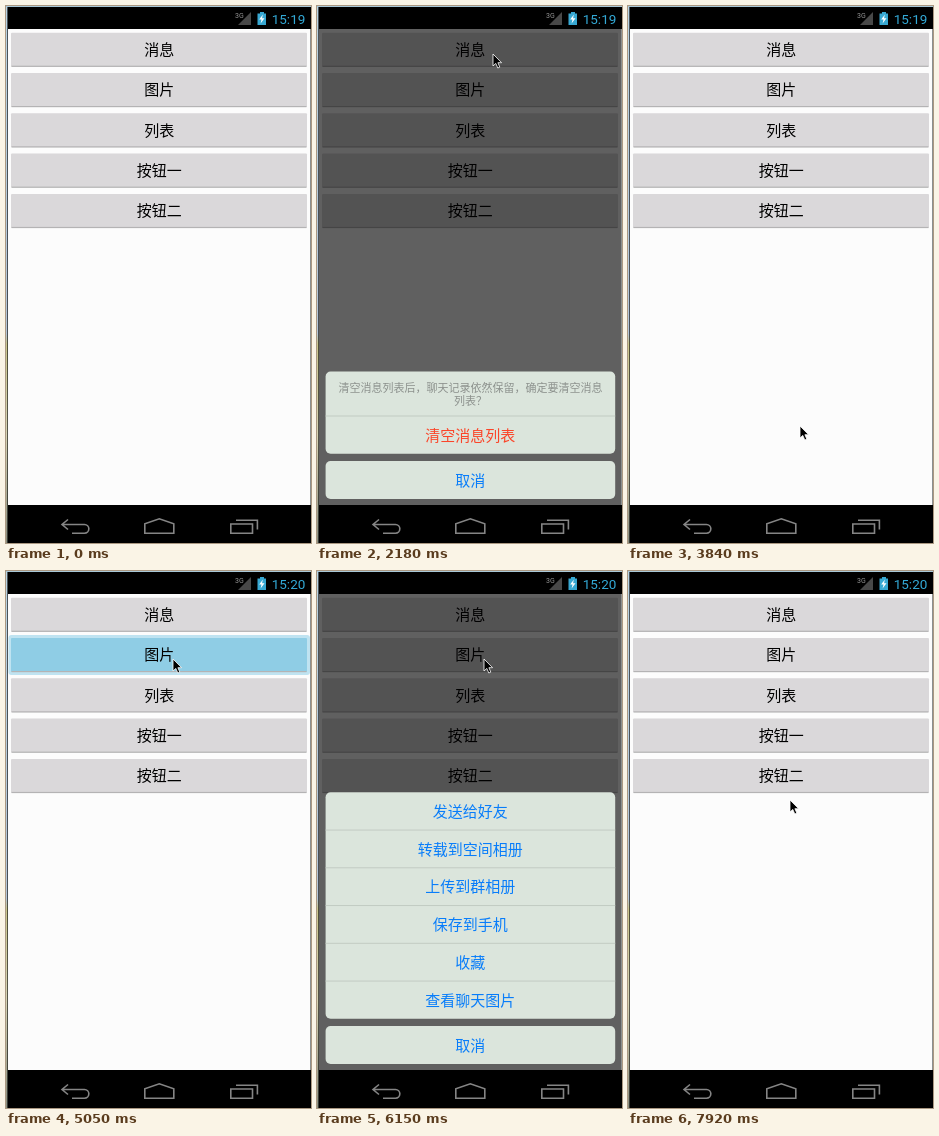
Recreate the animation shown at these times as an HTML page. Size 305 by 537 pixels, loop 8 s.

```html
<!DOCTYPE html>
<html lang="zh">
<head>
<meta charset="utf-8">
<title>底部菜单</title>
<style>
html, body { margin: 0; width: 100%; height: 100%; overflow: hidden; background: #000; }
svg { display: block; width: 305px; height: 537px; }
text { font-family: "Noto Sans CJK SC", "Noto Sans CJK", "Noto Sans", sans-serif; font-size: 15px; text-anchor: middle; }
.latin { font-family: Roboto, sans-serif; text-anchor: start; }
</style>
</head>
<body>
<svg viewBox="0 0 305 537">
  <defs>
    <linearGradient id="edge" x1="0" y1="0" x2="0" y2="1">
      <stop offset="0" stop-color="#b9d3e2"/>
      <stop offset=".61" stop-color="#b4c5d8"/>
      <stop offset=".63" stop-color="#c9c58c"/>
      <stop offset=".8" stop-color="#d6d3b4"/>
      <stop offset="1" stop-color="#8b8f80"/>
    </linearGradient>
    <clipPath id="screen"><rect x="2" y="23" width="303" height="476"/></clipPath>
  </defs>
  <rect width="305" height="537"/>
  <rect x="2" y="23" width="303" height="476" fill="#fcfcfc"/>
  <g id="buttons"></g>
  <rect id="dim" x="2" y="23" width="303" height="476"/>
  <g clip-path="url(#screen)">
    <g id="sheetA"></g>
    <g id="sheetB"></g>
  </g>
  <rect x="304" y="23" width="1" height="476" fill="#8c9090"/>
  <rect width="1.4" height="537" fill="url(#edge)"/>
  <rect width="305" height="1" fill="#a9c8d8"/>

  <path d="M232 19 L245 6 V19 Z" fill="#484848"/>
  <text class="latin" x="229" y="12" style="font-size:7px" fill="#949494">3G</text>
  <path d="M254 6 h4 v1.5 h2 V19 h-8.5 V7.5 h2.5 Z" fill="#38a8d2"/>
  <path d="M256.8 8.5 l-3.6 5 h2.3 l-.9 4 3.9 -5.2 h-2.4 Z" fill="#fff"/>
  <text id="clock" class="latin" x="265.7" y="17.7" style="font-size:13.5px" fill="#33a9d6"></text>

  <g fill="none" stroke="#858585" stroke-width="1.6">
    <path d="M62 513.5 L56 518.5 L62 523.5 M56 518.5 H78.5 A4.3 4.3 0 0 1 78.5 527.2 H66"/>
    <path d="M138.8 527.2 V517.8 L153.3 512.8 L167.8 517.8 V527.2 Z"/>
    <path d="M224.8 518 H246.5 V527.2 H224.8 Z M230 514.2 H251.4 V523.5"/>
  </g>
  <path id="cursor" d="M0 0 V12 L2.8 9.4 L4.8 14 L6.8 13.1 L4.9 8.7 H8.6 Z" stroke="#fff" stroke-width=".8"/>
</svg>
<script>
const LOOP = 8000, BLUE = "#087dfa", RED = "#fb4529", SHEET = "#dbe5dc";
const $ = id => document.getElementById(id);

function add(parent, tag, attrs, text) {
  const el = document.createElementNS("http://www.w3.org/2000/svg", tag);
  for (const k in attrs) el.setAttribute(k, attrs[k]);
  if (text) el.textContent = text;
  parent.append(el);
  return el;
}
const show = (el, on) => el.setAttribute("visibility", on ? "visible" : "hidden");
const label = (parent, text, cy, fill = "#000") => add(parent, "text", { x: 153.3, y: cy + 5.6, fill }, text);

// Main buttons
const buttons = ["消息", "图片", "列表", "按钮一", "按钮二"].map((name, i) => {
  const y = 26.7 + i * 40.3, g = $("buttons");
  const glow = add(g, "rect", { x: 2.5, y: y - 3, width: 301.5, height: 40, rx: 3, fill: "#bfe3f1" });
  const face = add(g, "rect", { x: 5, y, width: 296, height: 34, rx: 1 });
  add(g, "rect", { x: 5.5, y: y + 33, width: 295, height: 1.2, fill: "#b4b3b4" });
  label(g, name, y + 16.8);
  return on => {
    show(glow, on);
    face.setAttribute("fill", on ? "#8fcde5" : "#dad8da");
  };
});

// Bottom sheets
const ROW = 37.75, BOTTOM = 447.8;
const panel = (g, y, h) => add(g, "rect", { x: 8.6, y, width: 289.6, height: h, rx: 5, fill: SHEET });
const rule = (g, y) => add(g, "rect", { x: 8.6, y: y - .5, width: 289.6, height: 1, fill: "#c2cbc3" });
const pressRow = (g, d) => add(g, "path", { d, fill: "#b9c3ba" });
function cancel(g) {
  panel(g, 455, 38);
  label(g, "取消", 474, BLUE);
}

const sheetA = $("sheetA"), sheetB = $("sheetB");
panel(sheetA, 365.6, BOTTOM - 365.6);
const pressA = pressRow(sheetA, "M8.6 410 H298.2 V442.8 a5 5 0 0 1 -5 5 H13.6 a5 5 0 0 1 -5 -5 Z");
rule(sheetA, 410);
["清空消息列表后，聊天记录依然保留，确定要清空消息", "列表？"].forEach((line, i) =>
  add(sheetA, "text", { x: 153.5, y: 385.8 + i * 13, fill: "#8c918d", style: "font-size:11px" }, line));
label(sheetA, "清空消息列表", 429.3, RED);
cancel(sheetA);

const items = ["发送给好友", "转载到空间相册", "上传到群相册", "保存到手机", "收藏", "查看聊天图片"];
const topB = BOTTOM - ROW * items.length;
panel(sheetB, topB, ROW * items.length);
const pressB = pressRow(sheetB, `M8.6 ${topB + 2 * ROW} h289.6 v${ROW} h-289.6 Z`);
items.forEach((name, i) => {
  if (i) rule(sheetB, topB + i * ROW);
  label(sheetB, name, topB + (i + .5) * ROW, BLUE);
});
cancel(sheetB);

// Cursor trips: step times, start point, end point
const trips = [
  [[400, 540, 690, 830, 980, 1120], [296, 330], [176, 48]],
  [[2480, 2610, 2740, 2880, 3010, 3140], [176, 48], [172, 420]],
  [[4140, 4270, 4390, 4520, 4640, 4770], [172, 420], [167, 88]],
  [[6190, 6350, 6500, 6660, 6820], [167, 88], [162, 318]],
  [[7770, 7920], [162, 318], [162, 229]]
];
const ease = u => u * u * (3 - 2 * u);

function cursorAt(t) {
  const trip = trips.filter(([times]) => t >= times[0]).pop();
  if (!trip) return null;
  const [times, from, to] = trip;
  const u = ease(times.filter(s => s <= t).length / times.length);
  return from.map((v, i) => v + (to[i] - v) * u);
}

// Sheet stages: dimming starts, open, item pressed, sliding out, gone
const stages = [
  { g: sheetA, press: pressA, at: [2060, 2180, 3570, 3700, 3840], height: 134 },
  { g: sheetB, press: pressB, at: [5880, 6000, 7250, 7370, 7490], height: 278 }
];

function draw(t) {
  let dim = 0;
  for (const { g, press, at, height } of stages) {
    const stage = at.filter(s => s <= t).length;
    show(g, stage > 1 && stage < 5);
    press.setAttribute("opacity", stage === 3 ? 1 : 0);
    g.setAttribute("transform", `translate(0 ${stage === 4 ? height * .5 : 0})`);
    dim += [0, .065, .615, .615, .3, 0][stage];
  }
  $("dim").setAttribute("opacity", dim);
  buttons.forEach((press, i) =>
    press(i === 0 && t >= 1520 && t < 1790 || i === 1 && t >= 5050 && t < 5610));
  $("clock").textContent = t < 4520 ? "15:19" : "15:20";
  const p = cursorAt(t);
  show($("cursor"), p);
  if (p) $("cursor").setAttribute("transform", `translate(${p})`);
}

const start = performance.now();
function tick() {
  draw((performance.now() - start) % LOOP);
  requestAnimationFrame(tick);
}
tick();
</script>
</body>
</html>
```
